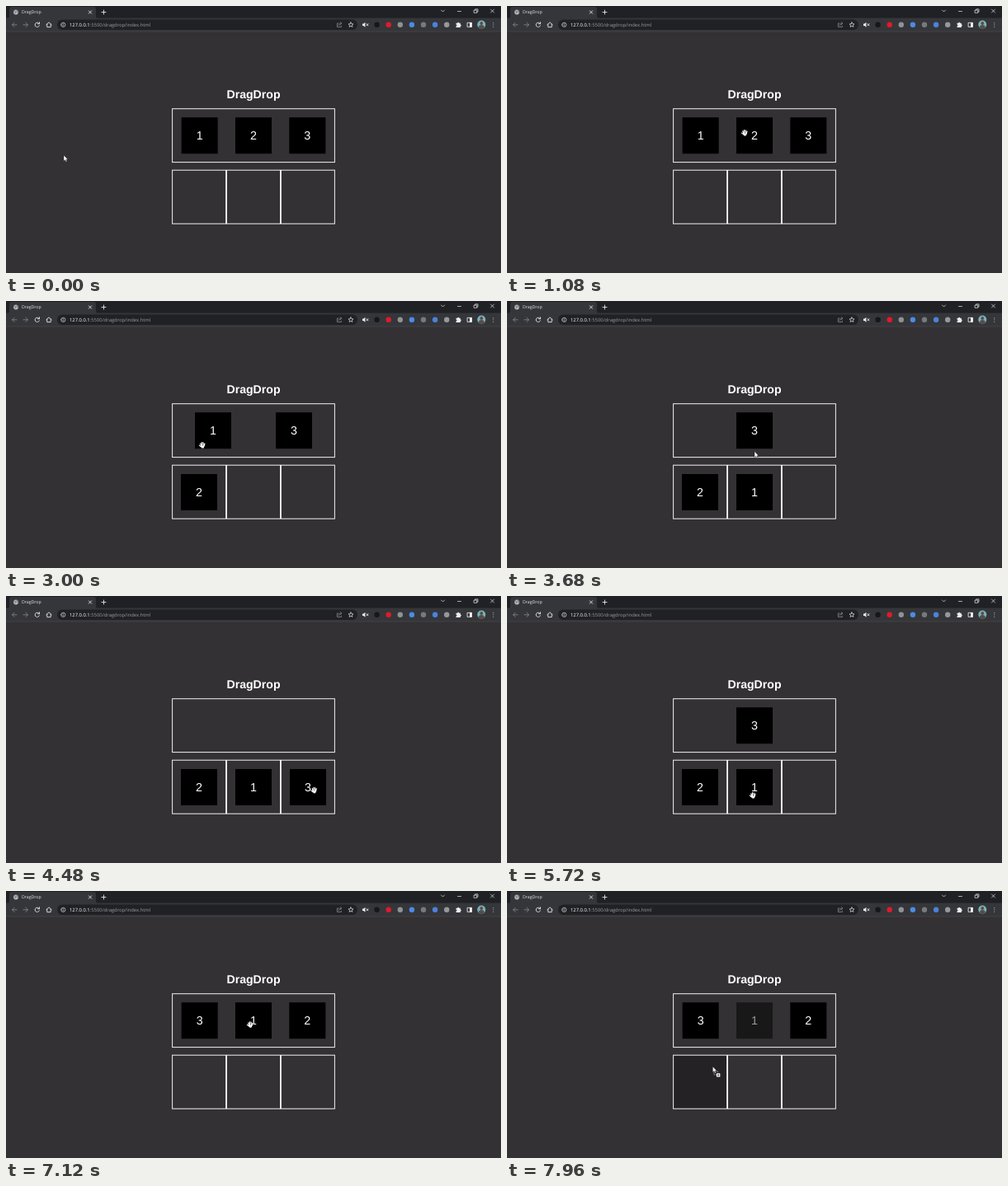
An HTML page for the animation above (8 s loop, 600 by 324 pixels).

```html
<!DOCTYPE html>
<html lang="en">
<head>
<meta charset="utf-8">
<title>DragDrop</title>
<style>
  html, body { margin: 0; width: 100%; height: 100%; overflow: hidden; background: #333133; }
  svg { display: block; width: 600px; height: 324px; }
  text { text-rendering: geometricPrecision; }
  .page { font-family: "Liberation Sans", Arial, sans-serif; fill: #fff; text-anchor: middle; }
  .ui { font-family: "Open Sans", sans-serif; }
  .line { fill: none; stroke: #e6e6e8; stroke-width: .9; stroke-linecap: round; stroke-linejoin: round; }
  .dim { stroke: #818286; }
  .thin { stroke-width: .7; }
  .box { fill: none; stroke: #f0f0f0; stroke-width: 1; }
</style>
</head>
<body>
<svg viewBox="0 0 600 324">
  <rect width="600" height="324" fill="#333133"/>

  <g class="ui">
    <rect width="600" height="15" fill="#202124"/>
    <path d="M2 15Q4 15 4 12V4Q4 1 7 1H106Q109 1 109 4V12Q109 15 111 15Z" fill="#35363a"/>
    <rect y="14.5" width="600" height="16.5" fill="#35363a"/>
    <path d="M0 31H600" stroke="#49494c" stroke-width=".7"/>
    <circle cx="12" cy="7.5" r="2.9" fill="#b5b7bb"/>
    <path d="M10 6L12 7L11 9M13 5L14 8" stroke="#55575b" stroke-width=".7" fill="none"/>
    <text x="19" y="9.4" font-size="5.2" fill="#e8e8ea">DragDrop</text>
    <path class="line" d="M100.3 5.8l3.4 3.4m0-3.4l-3.4 3.4M116 7.5h5m-2.5-2.5v5"/>
    <path class="line thin" d="M527.5 5l2 2 2-2M547.5 6.5h4M567.5 5h3.3v3.3h-3.3zM568.7 5v-1.2h3.3v3.3h-1.2M587.5 4l4 4m0-4l-4 4"/>

    <path class="line dim" d="M13 22.8H7.5m2.6-2.6l-2.6 2.6 2.6 2.6M21 22.8h5.5m-2.6-2.6l2.6 2.6-2.6 2.6"/>
    <path class="line" d="M40.2 21.4a2.7 2.7 0 1 0 .2 2.4M40.5 19.7v2h-2M48.8 22.8l3.2-3 3.2 3M49.8 22v3.6h4.4V22"/>
    <rect x="62" y="16.5" width="364" height="12.5" rx="6.2" fill="#202124"/>
    <path class="line thin" d="M66.7 22.8a2.6 2.6 0 1 0 5.2 0a2.6 2.6 0 1 0-5.2 0M69.3 22.6v1.4M69.3 21.3v.1"/>
    <text x="77" y="25" font-size="5.85" fill="#9a9ca0"><tspan fill="#fff" font-weight="500">127.0.0.1</tspan>:5500/dragdrop/index.html</text>
    <path class="line dim" d="M403 21h-1.6v4.4h5v-1.2M403 23.6q.5-2.6 3.6-2.6m-1.3-1.5l1.5 1.5-1.5 1.5"/>
    <path class="line thin" d="M418 19.8l.9 1.9 2.1.2-1.6 1.4.5 2.1-1.9-1.1-1.9 1.1.5-2.1-1.6-1.4 2.1-.2z"/>

    <path d="M432 21.6h1.4l2-1.8v6l-2-1.8H432z" fill="#eee"/>
    <path class="line" d="M437 21.6l2 2.2m0-2.2l-2 2.2"/>
    <g id="extensions"></g>
    <path d="M545.5 20.7h1.7a1 1 0 0 1 2 0h1.6v1.8a1 1 0 0 1 0 2v1.6h-5.3v-1.7a1 1 0 0 0 0-2z" fill="#eee"/>
    <rect class="line" x="559.5" y="20.3" width="5" height="5"/>
    <path d="M562 20h2.8v5.6H562z" fill="#eee"/>
    <circle cx="576.3" cy="22.6" r="5" fill="#79b2b9"/>
    <path d="M572.6 26a3.8 3.8 0 0 1 7.4 0 5 5 0 0 1-7.4 0z" fill="#594b48"/>
    <circle cx="576.3" cy="21" r="1.9" fill="#594b48"/>
    <path class="line" d="M590.7 20.4v.01M590.7 22.8v.01M590.7 25.2v.01"/>
  </g>

  <text class="page" x="300" y="112" font-size="14.1" font-weight="bold">DragDrop</text>
  <rect class="box" x="201.6" y="124.7" width="196.8" height="64.9"/>
  <g id="slots"></g>
  <g id="items" class="page" font-size="14.3"></g>

  <g id="arrow">
    <path d="M0 0V7.2L1.7 5.7 2.8 8.2 4 7.6 2.9 5.3H5Z" fill="#fff" stroke="#111" stroke-width=".4"/>
    <g id="badge">
      <path d="M1.5 7V10H5M4 6.3H7" fill="none" stroke="#ddd" stroke-width=".7" stroke-dasharray="1 .7"/>
      <rect x="4.6" y="8.3" width="4.4" height="4.4" rx=".5" fill="#fff"/>
      <path d="M5.7 10.5H7.9M6.8 9.4V11.6" stroke="#333" stroke-width=".8"/>
    </g>
  </g>
  <defs>
    <path id="fingers" d="M-2.2-2L-1 1M-.5-3.3V1M1.2-3V1M2.9-1.8L2 1.5M-3.5.2L-1.3 2M-.8 1.6H1.7L1.2 3H-.2Z"/>
  </defs>
  <g id="hand" fill="none" stroke-linecap="round" stroke-linejoin="round">
    <use href="#fingers" stroke="#151515" stroke-width="2"/>
    <use href="#fingers" stroke="#fff" stroke-width="1.2"/>
  </g>
</svg>
<script>
const LOOP = 8000, STEP = 40, SIZE = 44, PITCH = 66, TRAY = -1;
const $ = id => document.getElementById(id);

// Each drag: item, destination, start and end time, grip relative to the item's centre
const drags = [
  { label: '2', to: 0, pick: 2280, drop: 2720, grip: [-10, 6] },
  { label: '1', to: 1, pick: 3100, drop: 3480, grip: [-13, 17] },
  { label: '3', to: 2, pick: 3860, drop: 4280, grip: [0, 8] },
  { label: '3', to: TRAY, pick: 4600, drop: 5080, grip: [8, 4] },
  { label: '1', to: TRAY, pick: 5800, drop: 6120, grip: [-2, 10] },
  { label: '2', to: TRAY, pick: 6480, drop: 6840, grip: [14, -13] },
  { label: '1', to: 0, pick: 7560, drop: 8170, grip: [-10, 5] }
];

function add(parent, tag, attrs, text = '') {
  const el = document.createElementNS('http://www.w3.org/2000/svg', tag);
  for (const key in attrs) el.setAttribute(key, attrs[key]);
  el.textContent = text;
  parent.append(el);
  return el;
}

['#17171a', '#e2192c', '#909296', '#4b8be8', '#77797d', '#4b83dc', '#96989c'].forEach((fill, i) =>
  add($('extensions'), 'circle', { cx: 449.6 + i * 14.1, cy: 22.8, r: 3.2, fill }));

const slots = [0, 1, 2].map(i =>
  add($('slots'), 'rect', { class: 'box', x: 201.6 + i * 65.9, y: 199.2, width: 65, height: 65 }));

const items = ['1', '2', '3'].map(label => {
  const el = add($('items'), 'g', {});
  add(el, 'rect', { x: -SIZE / 2, y: -SIZE / 2, width: SIZE, height: SIZE });
  el.firstChild.style.fill = '#000';
  add(el, 'text', { y: 4.7 }, label);
  return { label, el };
});

function boardAt(t) {
  let tray = ['1', '2', '3'], cells = ['', '', ''];
  for (const { label, to, drop } of drags) {
    if (drop > t) break;
    tray = tray.filter(l => l !== label);
    cells = cells.map(l => l === label ? '' : l);
    if (to === TRAY) tray.push(label);
    else cells[to] = label;
  }
  return { tray, cells };
}

const slotCentre = i => [234 + i * PITCH, 232];

function itemCentre(label, { tray, cells }) {
  const i = tray.indexOf(label);
  return i < 0 ? slotCentre(cells.indexOf(label)) : [202 + 196 / tray.length * (i + .5), 157.2];
}

// The pointer wanders in, then rests briefly before each drag
const stops = [[0, 70, 181], [400, 185, 222], [1250, 300, 146]];
for (const { label, to, pick, drop, grip } of drags) {
  const [x, y] = itemCentre(label, boardAt(pick));
  const hold = [x + grip[0], y + grip[1]];
  const target = to === TRAY ? [300, 162] : slotCentre(to);
  stops.push([pick - 80, ...hold], [pick, ...hold], [drop, ...target]);
}

function pointerAt(t) {
  const i = stops.findIndex(s => s[0] > t);
  const [t0, x0, y0] = stops[i - 1], [t1, x1, y1] = stops[i];
  const u = (t - t0) / (t1 - t0), k = u * u * (3 - 2 * u);
  return [x0 + (x1 - x0) * k, y0 + (y1 - y0) * k];
}

function draw(t) {
  const [x, y] = pointerAt(t);
  const board = boardAt(t);
  const dragged = drags.find(d => d.pick <= t && t < d.drop)?.label;
  const within = ([cx, cy], size) => Math.max(Math.abs(x - cx), Math.abs(y - cy)) < size / 2;
  let overItem = false;

  for (const { label, el } of items) {
    const centre = itemCentre(label, board);
    el.setAttribute('transform', `translate(${centre})`);
    el.setAttribute('opacity', label === dragged ? .5 : 1);
    overItem ||= within(centre, SIZE);
  }

  slots.forEach((slot, i) => {
    const hovered = dragged && !board.cells[i] && within(slotCentre(i), PITCH);
    slot.style.fill = hovered ? '#242224' : 'none';
  });

  const grab = overItem && !dragged;
  for (const id of ['arrow', 'hand']) {
    $(id).setAttribute('transform', `translate(${x} ${y})`);
    $(id).style.display = (id === 'hand') === grab ? '' : 'none';
  }
  $('badge').style.display = dragged ? '' : 'none';
}

function tick() {
  const t = performance.now() % LOOP;
  draw(Math.floor(t / STEP) * STEP);
  requestAnimationFrame(tick);
}
tick();
</script>
</body>
</html>
```
